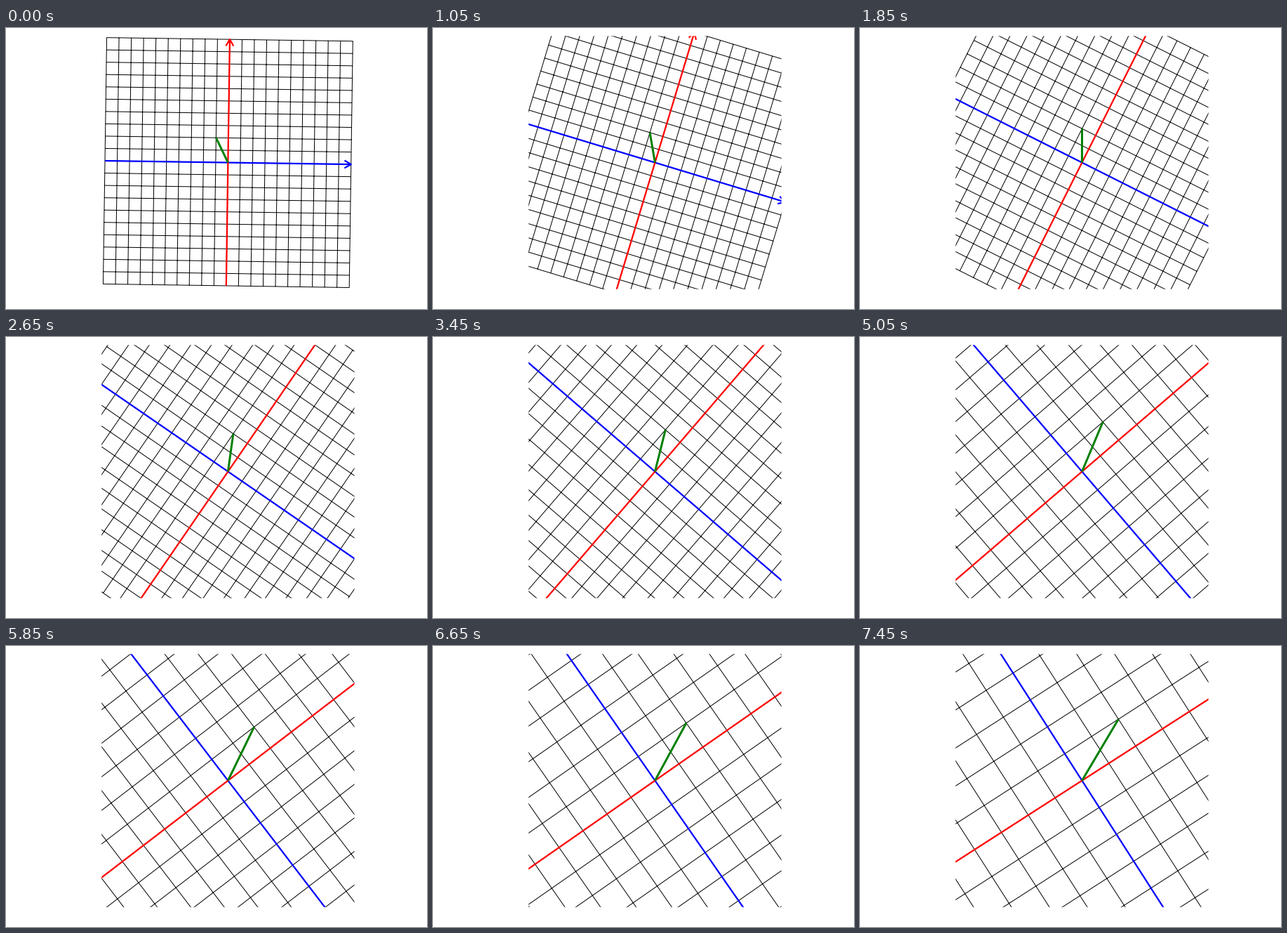
Recreate the animation shown at these times as a matplotlib script. Size 600x400 px, loop 7500 ms.

```python
import numpy as np
import matplotlib.pyplot as plt
from matplotlib.animation import FuncAnimation
from matplotlib.patches import Rectangle

W, H, DPI = 600, 400, 100
FRAMES, INTERVAL = 150, 50
PT = 72 / DPI                      # points per pixel
N = 10                             # grid runs from -N to N
SIDE = 360.3                       # plot region, shows -1.03 N to 1.03 N
CENTER = 316.38 + 191.56j
UNIT = SIDE / (2.06 * N)
TARGET = 2.6 * np.exp(-1j)         # scale and clockwise turn by one radian
VECTOR = -1 + 2j
HEAD = 10.8                        # arrowhead barb length

fig = plt.figure(figsize=(W / DPI, H / DPI), dpi=DPI, facecolor="white")
ax = fig.add_axes([0, 0, 1, 1])
ax.set(xlim=(0, W), ylim=(H, 0))
ax.axis("off")


def stroke(color, width):
    line, = ax.plot([], [], color=color, lw=width * PT, snap=False,
                    solid_capstyle="butt", solid_joinstyle="round")
    return line


def mask(x0, y0, x1, y1):
    ax.add_patch(Rectangle((x0, y0), x1 - x0, y1 - y0, fc="white", lw=0,
                           snap=False, zorder=5))


grid = stroke("black", 1)
x_axis = stroke("blue", 2.25)
y_axis = stroke("red", 2.25)
vector = stroke("green", 3)

# White margins trim the drawing to the square plot region.
left, right = CENTER.real - SIDE / 2, CENTER.real + SIDE / 2
top, bottom = CENTER.imag - SIDE / 2, CENTER.imag + SIDE / 2
mask(-1, -1, left, H + 1)
mask(right, -1, W + 1, H + 1)
mask(-1, -1, W + 1, top)
mask(-1, bottom, W + 1, H + 1)

gap = complex(np.nan, np.nan)
rows = np.array([p for k in range(-N, N + 1)
                 for p in (complex(-N, k), complex(N, k), gap)])
cells = np.concatenate([rows, rows * 1j])


def place(line, pts):
    pts = CENTER + np.conj(np.asarray(pts))
    line.set_data(pts.real, pts.imag)


def place_arrow(line, tip):
    back = -HEAD * tip / abs(tip)
    barb = np.exp(1j * np.pi / 6)
    place(line, [-tip, tip, gap, tip + back * barb, tip, tip + back / barb])


def update(i):
    t = (i + 1) / FRAMES
    z = UNIT * (1 + t * (TARGET - 1))
    place(grid, cells * z)
    place_arrow(x_axis, N * z)
    place_arrow(y_axis, N * z * 1j)
    place(vector, [0, VECTOR * z])
    return grid, x_axis, y_axis, vector


anim = FuncAnimation(fig, update, frames=FRAMES, interval=INTERVAL,
                     repeat=True, repeat_delay=0, blit=False)
plt.show()
```
